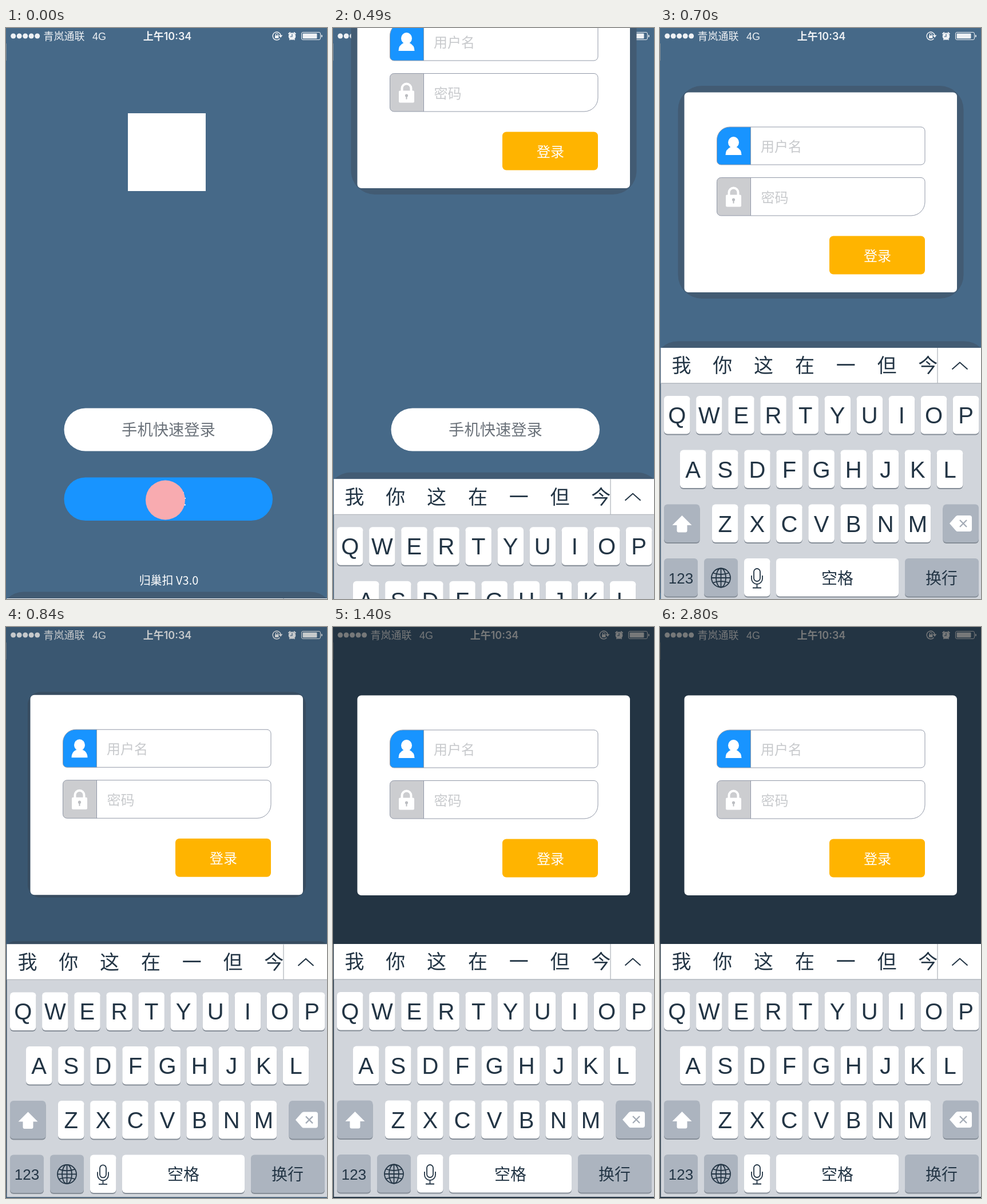
An HTML page that plays this animation: 561x998 px, repeating every 3.15 s.

```html
<!DOCTYPE html>
<html lang="zh-CN">
<head>
<meta charset="utf-8">
<title>登录</title>
<style>
  html, body { margin: 0; width: 100%; height: 100%; overflow: hidden; background: #466988; }
  svg { display: block; width: 100%; height: 100%; }
  text { font-family: "Noto Sans CJK SC", "Noto Sans CJK", sans-serif; text-anchor: middle; font-weight: 300; }
  .latin { font-family: "Liberation Sans", Arial, sans-serif; font-weight: 400; }
  .ink { fill: #233545; }
  .line { fill: none; stroke: #233545; stroke-width: 2; }
</style>
</head>
<body>
<svg viewBox="0 0 561 998">
  <rect width="561" height="998" fill="#466988"/>
  <rect y="27" width="1" height="30" fill="#7c8994"/>

  <g id="status" fill="#eef1f4">
    <text x="101.500" y="20.500" font-size="18" style="font-weight:400">青岚通联</text>
    <text x="163" y="20.500" font-size="18" class="latin">4G</text>
    <text x="282" y="20.500" font-size="18" style="font-weight:600;font-family:Inter,'Noto Sans CJK SC',sans-serif">上午10:34</text>
    <path d="M478.500 18.500A7 7 0 1 1 480 13" fill="none" stroke="#eef1f4" stroke-width="1.500"/>
    <path d="M476.500 12.500h7l-3.500 4.500z"/>
    <rect x="470" y="13" width="6.500" height="5" rx=".8"/>
    <path d="M471.300 13v-1.500a2 2 0 0 1 4 0V13" fill="none" stroke="#eef1f4" stroke-width="1.200"/>
    <circle cx="500" cy="14.500" r="6.300"/>
    <path d="M493.500 10.500l3.500-3M506.500 10.500l-3.500-3M495.500 21l1.500-2M504.500 21l-1.500-2" stroke="#eef1f4" stroke-width="1.800"/>
    <path d="M500 10.500v4.500h-3.500" fill="none" stroke="#466988" stroke-width="1.200"/>
    <rect x="516.500" y="7.500" width="33" height="13" rx="2.500" fill="none" stroke="#eef1f4"/>
    <rect x="518.500" y="9.500" width="25" height="9" rx="1"/>
    <path d="M551 11.500q2 .5 2 2.500t-2 2.500z"/>
  </g>

  <rect x="213" y="149" width="136" height="136" fill="#fff"/>
  <rect x="101.500" y="664.500" width="364.500" height="75" rx="37.500" fill="#fff"/>
  <text x="284" y="712" font-size="27.300" fill="#6b727a">手机快速登录</text>
  <rect x="101.500" y="785.500" width="364.500" height="75.500" rx="37.500" fill="#1894ff"/>
  <text x="284.500" y="834" font-size="28" fill="#fff">登 录</text>
  <text x="284.500" y="973" font-size="20" fill="#fff">归巢扣 V3.0</text>
  <circle id="touch" cx="278.500" cy="825" r="34.500" fill="#f8abb0"/>

  <rect id="cardShadow" fill="#425b73"/>
  <rect id="keysShadow" fill="#425b73"/>
  <rect id="dim" width="561" height="998"/>

  <g id="card">
    <rect x="42.500" width="476.500" height="349.500" rx="7" fill="#fff"/>
    <path d="M158.500 60.500H122A22.500 22.500 0 0 0 99.500 83V119.500a7 7 0 0 0 7 7H158.500Z" fill="#1894ff"/>
    <path d="M158.500 149H106.500a7 7 0 0 0-7 7V208.500a7 7 0 0 0 7 7H158.500Z" fill="#cccdd0"/>
    <g fill="none" stroke="#9299a8">
      <path d="M122 60.500H456a7 7 0 0 1 7 7V119.500a7 7 0 0 1-7 7H106.500a7 7 0 0 1-7-7V83a22.500 22.500 0 0 1 22.500-22.500ZM158.500 60.500v66"/>
      <path d="M106.500 149H456a7 7 0 0 1 7 7V191.500a24 24 0 0 1-24 24H106.500a7 7 0 0 1-7-7V156a7 7 0 0 1 7-7ZM158.500 149v66.500"/>
    </g>
    <g fill="#fff">
      <ellipse cx="128.500" cy="87.500" rx="9.500" ry="10"/>
      <path d="M114.500 109.500q0-10 9-14h10q9 4 9 14z"/>
      <rect x="115" y="179" width="27" height="21" rx="2"/>
      <path d="M120.500 180v-5a8 8 0 0 1 16 0v5" fill="none" stroke="#fff" stroke-width="4"/>
    </g>
    <path d="M128.500 188v6" stroke="#bbbdc1" stroke-width="2"/>
    <circle cx="128.500" cy="187.500" r="2.600" fill="#bbbdc1"/>
    <text x="212" y="103" font-size="24" fill="#c8cacd">用户名</text>
    <text x="200.500" y="192" font-size="24" fill="#c8cacd">密码</text>
    <rect id="caret" x="175" y="82" width="2" height="23" fill="#1894ff"/>
    <rect x="296" y="251" width="167" height="67" rx="7" fill="#ffb400"/>
    <text x="380" y="294" font-size="24" fill="#fff">登录</text>
  </g>

  <g id="keys">
    <rect x="1.500" width="560" height="442" fill="#d1d5db"/>
    <rect x="1.500" width="560" height="62" fill="#fff"/>
    <path d="M1.500 62H561M485 0V62" stroke="#b3b8be" stroke-width="1.300"/>
    <clipPath id="bar"><rect width="484" height="62"/></clipPath>
    <g id="words" class="ink" font-size="34" clip-path="url(#bar)"></g>
    <path class="line" d="M510.500 37.500L524 25.500L537.500 37.500"/>
    <g id="caps"></g>
    <path d="M38.500 293L55.500 310H47.500V319.500q0 3-3 3H32.500q-3 0-3-3V310H21.500Z" fill="#fff"/>
    <path d="M506 307L517 294.500q1.500-1.500 3-1.500H541q4 0 4 4V317q0 4-4 4H520q-1.500 0-3-1.500Z" fill="#fff"/>
    <path d="M524 301l12 12M536 301l-12 12" stroke="#a3abb6" stroke-width="2.200"/>
    <g class="line" style="stroke-width:1.800">
      <circle cx="106.500" cy="402" r="16.500"/>
      <ellipse cx="106.500" cy="402" rx="8.500" ry="16.500"/>
      <path d="M106.500 385.500v33M90 402h33M93 393.500q13.500 5 27 0M93 410.500q13.500-5 27 0"/>
      <rect x="164" y="386" width="11" height="22" rx="5.500"/>
      <path d="M160 398v5.500a9.500 9.500 0 0 0 19 0V398M169.500 413v6.500M162 419.500h15"/>
    </g>
    <g class="ink">
      <text class="latin" x="36.500" y="411.500" font-size="26">123</text>
      <text x="310" y="412.500" font-size="28">空格</text>
      <text x="492" y="412.500" font-size="28">换行</text>
    </g>
  </g>
</svg>
<script>
const $ = id => document.getElementById(id);

function add(parent, tag, attrs, text = '') {
  const el = document.createElementNS('http://www.w3.org/2000/svg', tag);
  set(el, attrs);
  el.textContent = text;
  parent.append(el);
}

function set(el, attrs) {
  for (const name in attrs) el.setAttribute(name, attrs[name]);
}

function cap(x, y, width, fill = '#fff') {
  const box = { x, width, height: 66.5, rx: 6 };
  add($('caps'), 'rect', { ...box, y: y + 2, fill: '#858d97' });
  add($('caps'), 'rect', { ...box, y, fill });
}

for (let i = 0; i < 5; i++) add($('status'), 'circle', { cx: 12.7 + i * 10.5, cy: 14, r: 4.5 });
[...'我你这在一但今'].forEach((c, i) => add($('words'), 'text', { x: 37.5 + i * 71.8, y: 43.3 }, c));

[['QWERTYUIOP', 7, 84], ['ASDFGHJKL', 35, 178.5], ['ZXCVBNM', 91, 273.5]].forEach(([row, left, y]) =>
  [...row].forEach((c, i) => {
    const x = left + i * 56.1;
    cap(x, y, 45.5);
    add($('caps'), 'text', { x: x + 22.7, y: y + 48, 'font-size': 40, class: 'latin ink' }, c);
  }));

const GRAY = '#acb4bf';
cap(7, 273.5, 62.5, GRAY);
cap(494.5, 273.5, 62.5, GRAY);
cap(7, 368, 59, GRAY);
cap(77, 368, 59, GRAY);
cap(147, 368, 45.5);
cap(203, 368, 214);
cap(428, 368, 129, GRAY);

const LOOP = 3150, STEP = 70;
const clamp = v => Math.max(0, Math.min(1, v));

// Distance left to travel; shrinks by `rate` every 140 ms
const rest = (t, far, near, rate) =>
  t < 490 ? far : t > 900 ? 0 : Math.min(far, near * rate ** ((560 - t) / 140));

function draw(now) {
  const time = now % LOOP;
  const t = Math.floor(time / STEP) * STEP;
  const cardY = 119.5 - rest(t, 490, 63, 9);
  const keysY = 554 + rest(t, 443, 65, 13);
  const dim = clamp((t - 700) / 420);
  const grow = 11.5 * (1 - dim) ** 2;

  set($('touch'), { opacity: t < 140 ? 1 : clamp((420 - t) / 350) });
  set($('card'), { transform: `translate(0 ${cardY})` });
  set($('keys'), { transform: `translate(0 ${keysY})` });
  set($('cardShadow'), {
    x: 43 - grow, y: cardY - grow, width: 476 + 2 * grow, height: 349 + 2 * grow, rx: 7 + 3 * grow
  });
  set($('keysShadow'), {
    x: 2 - grow, y: keysY - grow, width: 559 + 2 * grow, height: 442 + grow, rx: 3.5 * grow
  });
  set($('dim'), { opacity: dim / 2 });
  set($('caret'), { opacity: t >= 1190 && (t < 1400 || Math.floor((t - 1400) / 350) % 2) ? 1 : 0 });
  requestAnimationFrame(draw);
}
draw(performance.now());
</script>
</body>
</html>
```
